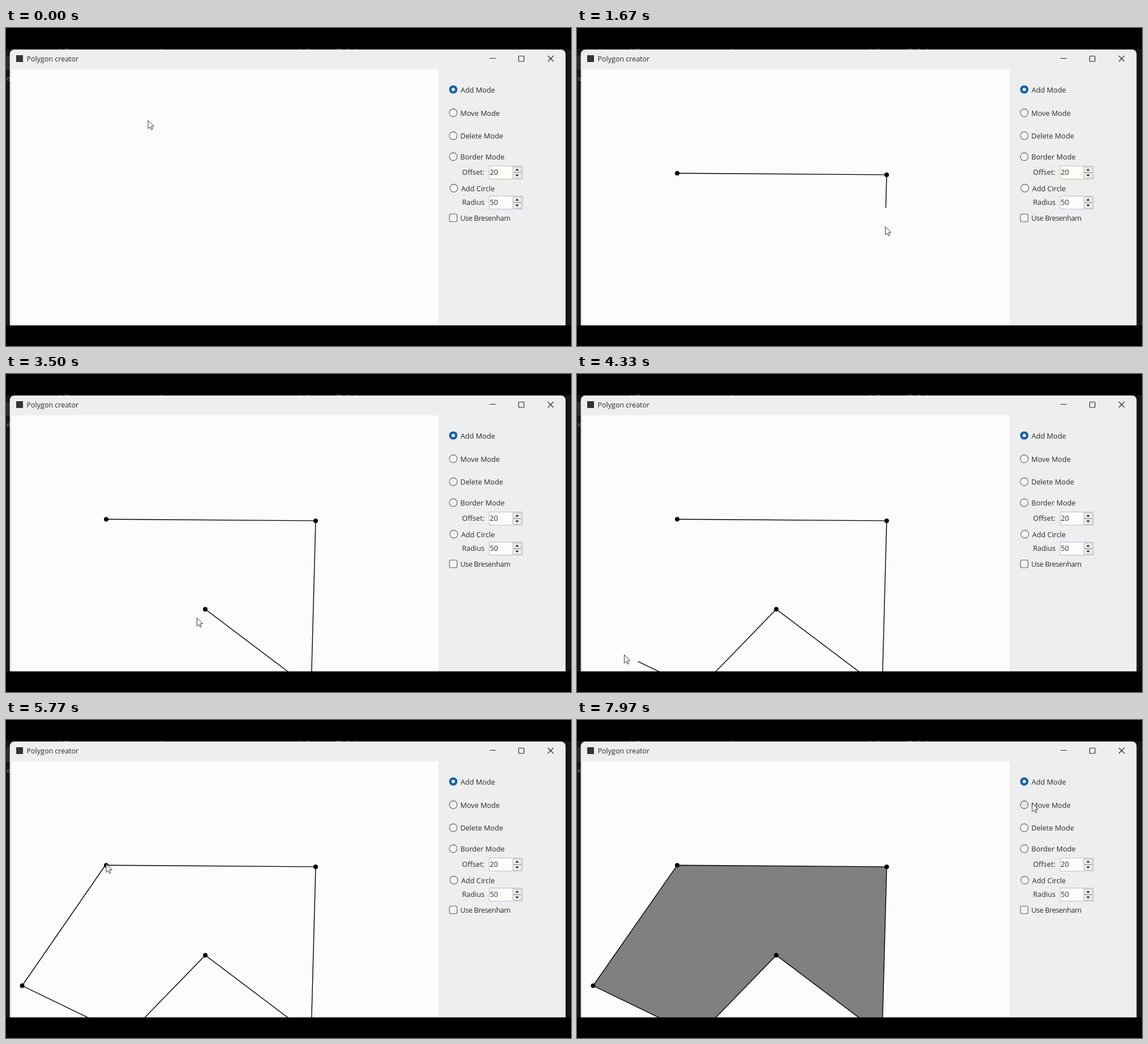
An HTML page that plays this animation: 998x561 px, repeating every 8 s.

```html
<!DOCTYPE html>
<html lang="en">
<head>
<meta charset="utf-8">
<title>Polygon creator</title>
<style>
  html, body { margin: 0; width: 100%; height: 100%; overflow: hidden; background: #000; }
  svg { display: block; width: 100%; height: 100%; }
  text { font: 12.7px "Open Sans", "Noto Sans", sans-serif; fill: #2b2b2b; }
  .line { fill: none; stroke: #000; stroke-width: 1.4; }
  .mark { fill: none; stroke: #2a2a2a; stroke-width: 1.2; }
  .box { fill: #f4f4f4; stroke: #626262; stroke-width: 1.1; }
</style>
</head>
<body>
<svg viewBox="0 0 998 561">
  <rect width="998" height="561"/>
  <rect y="37" width="998" height="488" fill="#151517"/>
  <rect y="49" width="8" height="25" fill="#2b2b2d"/>
  <text x="-4" y="93" style="font-size:11px;fill:#777">ze</text>
  <path d="M95 37h3m5 0h8m162 0h3m241 0h3m10 0h5m48 0h10m8 0h5m11 0h3" stroke="#6a6688"/>
  <path d="M6.7 526V46a8 8 0 0 1 8-8H980.4a8 8 0 0 1 8 8V526z" fill="#eee"/>
  <rect x="10" y="73" width="754" height="453" fill="#fcfcfb"/>
  <rect x="18" y="48" width="12" height="12" fill="#333"/>
  <text x="36.5" y="59" style="font-size:12.5px">Polygon creator</text>
  <path class="mark" d="M854 53.5h11M957 49l10 10m0-10l-10 10"/>
  <rect class="mark" x="905.5" y="49.5" width="9.5" height="9.5" rx="1"/>
  <g id="panel"></g>
  <path id="fill" fill="#808080"/>
  <path id="edges" class="line"/>
  <g id="dots"></g>
  <path id="cursor" d="M0 0V14.6L3.4 11.4 5.7 16.5 8 15.5 5.8 10.5 10.2 10.3z" fill="#fff" stroke="#333" stroke-width="1" stroke-linejoin="round"/>
  <rect y="524.6" width="998" height="37"/>
</svg>
<script>
const LOOP = 8000, LAG = 50, FILL_AT = 6900;
const $ = id => document.getElementById(id);

const points = [[177, 256.2], [547, 258.9], [539, 556], [352, 415], [213, 558], [28.5, 468.8]];
const clicks = [360, 1410, 2080, 3380, 3870, 4560];

// Cursor trips: start, end, from, to, optional bend
const trips = [
  [0, 350, [251, 163], [177, 255]],
  [372, 1390, [177, 255], [547, 259], [362, 249.5]],
  [1450, 2050, [547, 259], points[2]],
  [2700, 3300, points[2], points[3]],
  [3410, 3860, points[3], points[4]],
  [3980, 4530, points[4], points[5]],
  [4605, 5655, points[5], [177, 254], [73.5, 346.5]],
  [7540, 7970, [177, 254], [804, 147]]
];

const radio = (x, y, on) => on
  ? `<circle cx="${x}" cy="${y}" r="7.3" fill="#0a5fb0"/><circle cx="${x}" cy="${y}" r="3" fill="#fff"/>`
  : `<circle class="box" cx="${x}" cy="${y}" r="6.9"/>`;
const label = (x, y, s, style = '') => `<text x="${x}" y="${y}" style="${style}">${s}</text>`;
const spinner = (y, value, tint) => `
  <rect x="853.5" y="${y + .5}" width="59" height="23" fill="#fcfcfb" stroke="${tint}"/>
  <path d="M895.5 ${y + 2}h15v9.5h-15zM895.5 ${y + 12.5}h15v9.5h-15z" fill="#eee" stroke="#b0b0b0"/>
  <path d="M899.5 ${y + 8.5}l3.3-3.5 3.3 3.5zM899.5 ${y + 15.5}l3.3 3.5 3.3-3.5z" fill="#222"/>
  ${label(854.5, y + 15.5, value)}`;

$('panel').innerHTML =
  radio(790, 108.5, true) + label(803, 113.5, 'Add Mode') +
  `<g id="move">${radio(790, 149.5)}</g>` + label(802.5, 155, 'Move Mode') +
  radio(790, 190) + label(802.5, 195, 'Delete Mode') +
  radio(790, 227) + label(802.5, 232, 'Border Mode') +
  label(805.5, 258.5, 'Offset:') + spinner(243, 20, '#c4c4a8') +
  radio(791, 282.5) + label(804, 287.5, 'Add Circle') +
  label(805.5, 312, 'Radius') + spinner(296, 50, '#bcbcdc') +
  '<rect class="box" x="783.3" y="328.3" width="13.4" height="13.4" rx="2.6"/>' +
  label(802.5, 340, 'Use Bresenham', 'letter-spacing:-.4px');

$('dots').innerHTML = points.map(([x, y]) => `<circle cx="${x}" cy="${y}" r="4"/>`).join('');
$('fill').setAttribute('d', 'M' + points.join('L') + 'z');
const dots = [...$('dots').children];
const moveRadio = $('move').firstElementChild;

const ease = u => u * u * (3 - 2 * u);
const show = (el, on) => el.setAttribute('visibility', on ? 'visible' : 'hidden');

function cursorAt(t) {
  const [start, end, a, b, bend] = trips.filter(trip => trip[0] <= t).pop() || trips[0];
  const k = ease(Math.min(1, Math.max(0, (t - start) / (end - start))));
  return a.map((v, i) => {
    const mid = bend ? bend[i] : (v + b[i]) / 2;
    return (1 - k) ** 2 * v + 2 * k * (1 - k) * mid + k * k * b[i];
  });
}

function draw(t) {
  const [x, y] = cursorAt(t);
  const placed = clicks.filter(c => c <= t).length;
  const closed = t >= FILL_AT;
  const path = points.slice(0, placed);
  if (placed && !closed) path.push(cursorAt(Math.max(t - LAG, clicks[placed - 1])));
  $('edges').setAttribute('d', path.length ? 'M' + path.join('L') + (closed ? 'z' : '') : '');
  dots.forEach((dot, i) => show(dot, i < placed));
  show($('fill'), closed);
  $('cursor').setAttribute('transform', `translate(${x.toFixed(2)} ${y.toFixed(2)})`);
  moveRadio.style.fill = x > 782 && Math.abs(y - 150) < 12 ? '#e6e6e6' : '';
}

const begin = performance.now();
function tick() {
  draw((performance.now() - begin) % LOOP);
  requestAnimationFrame(tick);
}
draw(0);
requestAnimationFrame(tick);
</script>
</body>
</html>
```
